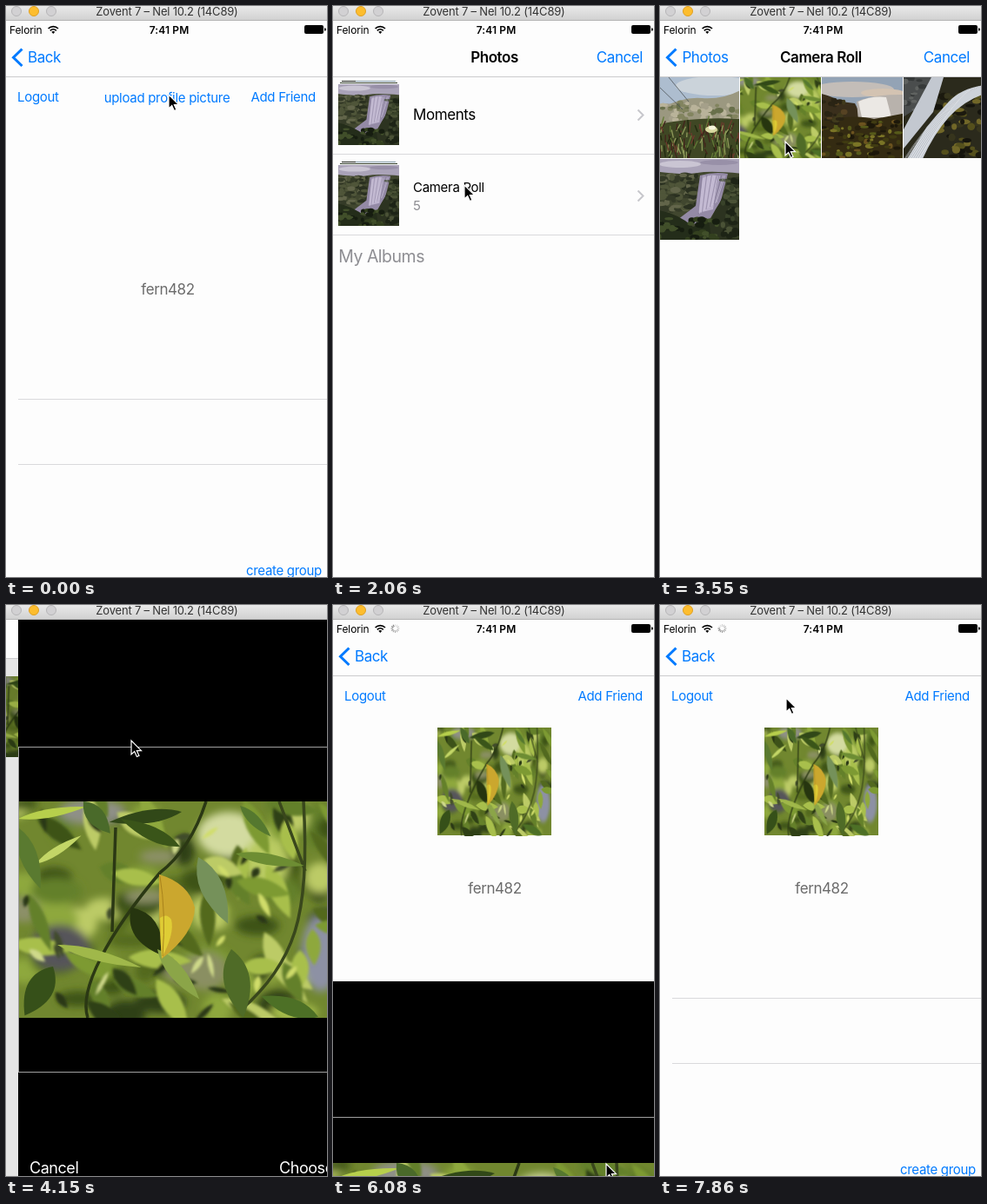
These frames come from a looping animation (369 px wide and 657 px high, 8 s). An HTML page:

```html
<!DOCTYPE html>
<html lang="en">
<head>
<meta charset="utf-8">
<title>Profile picture upload</title>
<style>
  html, body { margin: 0; width: 100%; height: 100%; overflow: hidden; background: #fdfdfd; }
  svg#stage { display: block; width: 369px; height: 657px; --page: #fdfdfd; }
  text { font: 17px Inter, "Open Sans", sans-serif; letter-spacing: -.025em; }
  .s { font-size: 15px; letter-spacing: -.02em; }
  .xs { font-size: 12px; letter-spacing: -.01em; }
  .b { font-weight: 600; }
  .m { text-anchor: middle; }
  .e { text-anchor: end; }
  .link { fill: #007aff; }
  .line { fill: none; stroke: #d9d9dc; }
  .page { fill: var(--page); }
  .arrow { fill: none; stroke: #007aff; stroke-width: 3; }
  .more { fill: none; stroke: #c7c7cc; stroke-width: 2; }
  #shade { mix-blend-mode: darken; }
</style>
</head>
<body>
<svg id="stage" viewBox="0 0 369 657">
  <defs>
    <linearGradient id="bar" x2="0" y2="1">
      <stop stop-color="#e9e9e9"/><stop offset="1" stop-color="#d0d0d0"/>
    </linearGradient>
    <linearGradient id="edge">
      <stop stop-color="#e9e9e9"/><stop offset=".8" stop-color="#e2e2e2"/><stop offset="1" stop-color="#cdcdcd"/>
    </linearGradient>
    <linearGradient id="fade">
      <stop style="stop-color:var(--page)" stop-opacity="0"/>
      <stop offset=".25" style="stop-color:var(--page)"/>
    </linearGradient>
    <filter id="soft"><feGaussianBlur stdDeviation="5"/></filter>
    <filter id="hazy"><feGaussianBlur stdDeviation="1.6"/></filter>
    <filter id="fine"><feGaussianBlur stdDeviation=".6"/></filter>
    <g id="photos"></g>
  </defs>

  <g id="home">
    <rect width="369" height="657" fill="#fdfdfd"/>
    <path class="line" d="M0 81.5H369" style="stroke:#cbcbcd"/>
    <path class="arrow" d="M18.5 49.5L8.5 59.3l10 9.7"/>
    <text class="link" x="25" y="65">Back</text>
    <text class="link s" x="13" y="109.5">Logout</text>
    <text class="link s m" id="upload" x="185" y="111">upload profile picture</text>
    <text class="link s e" x="356" y="109.5">Add Friend</text>
    <g id="avatar" transform="translate(120 141) scale(.3493 .498)">
      <use href="#leaves" width="375" height="249"/>
    </g>
    <text class="m" x="186" y="331.5" fill="#6b6b6b">fern482</text>
    <path class="line" d="M14 452.5H369M14 527.5H369"/>
    <text class="link s e" x="363" y="654.5">create group</text>
  </g>

  <g id="sheet">
    <g id="list">
      <rect class="page" x="-2" y="17" width="375" height="667"/>
      <rect id="picked" x="-2" y="174" width="375" height="90" fill="#cdcdcd"/>
      <path class="line" d="M0 170.5H373M0 263.5H373"/>
      <g id="stacks"></g>
      <text x="92" y="130.5">Moments</text>
      <text class="s" x="92" y="214">Camera Roll</text>
      <text class="s" x="92" y="235" fill="#8e8e93">5</text>
      <path class="more" d="M350.5 119.5l6 6-6 6M350.5 212.5l6 6-6 6"/>
      <text class="e" x="105" y="295" fill="#8e8e93" style="font-size:19.5px">My Albums</text>
    </g>
    <rect id="shade" x="-10" y="82" width="8" height="602" fill="url(#edge)"/>
    <g id="album">
      <rect class="page" x="-2" y="17" width="500" height="667"/>
      <g id="cells"></g>
    </g>
    <rect id="dim" y="17" width="369" height="640"/>
    <g id="nav">
      <rect class="page" x="-2" y="17" width="600" height="64"/>
      <path class="line" d="M-2 81.5H598" style="stroke:#cbcbcd"/>
      <path class="arrow" id="back" d="M18.5 49.5L8.5 59.3l10 9.7"/>
      <text class="m" id="photosTitle" y="65">Photos</text>
      <text class="b" id="rollTitle" y="65">Camera Roll</text>
      <rect x="276" y="40" width="97" height="36" fill="url(#fade)"/>
      <text class="link e" x="356" y="65">Cancel</text>
    </g>
  </g>

  <g id="crop">
    <rect x="-2" y="17" width="375" height="667"/>
    <use href="#leaves" x="-2" y="226" width="375" height="249"/>
    <rect id="frame" x="-1.5" y="163.5" width="374" height="374" fill="none" stroke="#a0a0a0"/>
    <g fill="#fff">
      <text x="11" y="654" style="font-size:18px">Cancel</text>
      <text x="298" y="654" style="font-size:18px">Choose</text>
    </g>
  </g>

  <g id="status">
    <text class="xs" x="4" y="31.5">Felorin</text>
    <g fill="none" stroke="#000" stroke-width="1.7">
      <path d="M48.6 26a8 8 0 0 1 11.4 0M50.8 28.4a5 5 0 0 1 7 0"/>
      <path d="M54.3 32l-2-2.2a3 3 0 0 1 4 0z" fill="#000" stroke="none"/>
    </g>
    <g id="spinner"></g>
    <text class="xs b m" x="187.5" y="31.5" style="letter-spacing:.01em">7:41 PM</text>
    <rect x="343" y="22" width="22" height="10" rx="2"/>
    <path d="M366 25.2q2 .3 2 1.8t-2 1.8z"/>
  </g>

  <g id="window">
    <rect width="369" height="17" fill="url(#bar)"/>
    <path d="M0 16.5H369" stroke="#b4b4b4"/>
    <g fill="#d2d1d3" stroke="#b6b5b7">
      <circle cx="12" cy="6" r="5.5"/>
      <circle cx="32" cy="6" r="5.5" fill="#fdbd2e" stroke="#dfa023"/>
      <circle cx="52" cy="6" r="5.5"/>
    </g>
    <text class="m" x="185" y="11" fill="#333" style="font-size:13px;letter-spacing:-.015em">Zovent 7 – Nel 10.2 (14C89)</text>
  </g>

  <path id="cursor" d="M0 0V16l3.7-3.4 2.7 5.9 2.6-1.1-2.6-5.7h5.1z" stroke="#fff" stroke-width="1.2"/>
</svg>

<script>
const $ = id => document.getElementById(id);
const set = (id, attrs) => {
  for (const k in attrs) $(id).setAttribute(k, attrs[k]);
};

// ---- pictures ----
let seed = 11;
const rnd = (a = 0, b = 1) => {
  seed = (seed * 16807) % 2147483647;
  return +(a + (b - a) * seed / 2147483647).toFixed(2);
};
const pick = list => list[Math.floor(Math.random.call ? rnd(0, list.length - .01) : 0)];
const many = (n, make) => Array.from({ length: n }, (_, i) => make(i)).join('');
const blob = (x, y, rx, ry, fill) => `<ellipse cx="${x}" cy="${y}" rx="${rx}" ry="${ry}" fill="${fill}"/>`;
const shape = (d, fill) => `<path d="${d}" fill="${fill}"/>`;
const stroke = (d, color, w) => `<path d="${d}" fill="none" stroke="${color}" stroke-width="${w}"/>`;
const blur = (id, body) => `<g filter="url(#${id})">${body}</g>`;
const leaf = (x, y, len, w, turn, fill) =>
  `<path transform="translate(${x} ${y}) rotate(${turn})" d="M0 0Q${len * .4} ${-w} ${len} 0Q${len * .4} ${w} 0 0" fill="${fill}"/>`;
const photo = (id, w, h, base, body) =>
  `<symbol id="${id}" viewBox="0 0 ${w} ${h}" preserveAspectRatio="xMidYMid slice">
    <rect width="${w}" height="${h}" fill="${base}"/>${body}</symbol>`;
// Rough ground: small blots scattered in a box.
const texture = (n, [x0, y0, x1, y1], size, colors) =>
  many(n, () => blob(rnd(x0, x1), rnd(y0, y1), rnd(size / 3, size), rnd(size / 4, size / 1.6), pick(colors)));

const light = ['#8ea83c', '#a8bf4c', '#bccb66', '#7d9a33'];
const dark = ['#3d5219', '#52691f', '#64802a', '#2f4016'];
const leaves = photo('leaves', 375, 249, '#71872f',
  blur('soft',
    texture(70, [0, 0, 375, 249], 30, [...light, ...dark, '#8c9068']) +
    blob(48, 168, 34, 26, '#57545a') + blob(348, 175, 22, 44, '#8d91a4') + blob(85, 12, 38, 15, '#8f9087') +
    blob(242, 38, 36, 26, '#d3dba0') + blob(285, 70, 26, 30, '#b9cb62') + blob(215, 195, 26, 22, '#8a8f62')) +
  blur('hazy',
    many(45, () => leaf(rnd(-20, 375), rnd(-20, 235), rnd(40, 75), rnd(14, 24), rnd(-10, 100), pick([...light, ...dark]))) +
    many(30, () => leaf(rnd(0, 375), rnd(0, 240), rnd(14, 34), rnd(5, 10), rnd(0, 180), pick(['#cfd98a', '#2a3815', '#d0dd6a', '#414b2c'])))) +
  blur('fine',
    stroke('M163 82Q198 55 216 0M163 82Q118 135 95 180T80 249M112 30L108 150', '#2b3814', 3.5) +
    stroke('M328 0Q334 100 318 150T256 240M300 0L330 80', '#39471c', 3.5) +
    leaf(0, 20, 80, 10, -10, '#b7cf4c') + leaf(20, 72, 62, 9, -32, '#c3d667') + leaf(75, 0, 48, 20, 50, '#4a6a2a') +
    leaf(188, 12, 84, 15, 172, '#314818') + leaf(186, 52, 75, 16, 205, '#3a5519') +
    leaf(0, 30, 75, 20, 70, '#5a7a30') + leaf(130, 122, 66, 28, 57, '#26350f') +
    leaf(207, 64, 84, 26, 66, '#75915a') + leaf(160, 170, 75, 17, 50, '#8ba548') +
    leaf(255, 5, 50, 12, 45, '#55782f') + leaf(250, 60, 80, 13, 10, '#6d8d33') +
    leaf(40, 190, 65, 30, 120, '#365019') + leaf(345, 248, 70, 20, 200, '#4d7026') +
    leaf(45, 165, 100, 12, 15, '#a0b84a') + leaf(245, 170, 80, 30, 80, '#4f6b27') +
    shape('M162 84Q196 94 203 122Q203 152 165 181Q161 135 162 84z', '#cba72e') +
    shape('M163 134Q171 128 176 136Q180 152 165 180z', '#dfcd35') +
    stroke('M163 86Q170 128 166 178', '#a9831c', 1)));

const dunes = photo('dunes', 93, 93, '#adbdcf',
  blur('fine',
    blob(65, 10, 45, 11, '#cbd3da') +
    shape('M-5 40Q25 22 50 24T98 13V60H-5z', '#9b9880') +
    texture(60, [0, 30, 93, 52], 6, ['#82845f', '#b9b39a', '#69704b', '#a5a08a']) +
    shape('M0 54Q45 45 93 48V93H0z', '#3f4724') +
    many(130, () => {
      const x = rnd(0, 93), y = rnd(58, 98);
      return stroke(`M${x} ${y}l${rnd(-4, 5)} ${-rnd(5, 15)}`, pick(['#627a36', '#20280f', '#6d3a2d', '#8f9a5a', '#43241c']), 1.3);
    }) +
    stroke('M0 10L28 37M12 0L35 28', '#4d5358', .8) +
    blob(61, 60, 7, 4, '#d9d9a0') + blob(62, 58, 4, 2.5, '#f7f6dc')));

const coast = photo('coast', 93, 93, '#93a3b5',
  blur('fine',
    blob(35, 14, 48, 9, '#c3bdb8') + blob(70, 18, 25, 5, '#d3c3b2') +
    shape('M-4 18Q12 22 22 28L38 30 48 50-4 56z', '#3a2f1c') +
    shape('M40 28Q60 19 98 20V50H42z', '#b8b2ac') +
    shape('M42 28Q58 21 74 23L80 46H46z', '#ebe8e4') +
    shape('M-4 50Q40 42 60 48L98 41V98H-4z', '#342b12') +
    texture(90, [0, 50, 93, 93], 5, ['#565a1a', '#1d180a', '#6c531f', '#403b12', '#7a7426', '#28210e']) +
    texture(25, [0, 26, 28, 52], 5, ['#2a2414', '#564223', '#403a1c'])));

const stream = photo('stream', 93, 93, '#2b2a1c',
  blur('fine',
    texture(70, [35, 20, 93, 93], 7, ['#55501c', '#1b190e', '#716728', '#37351d', '#15140d']) +
    shape('M-4-4H40L18 34-4 48z', '#4a4d4d') +
    texture(20, [0, 0, 30, 40], 6, ['#363939', '#5f6260']) +
    shape('M93 9Q66 13 52 28T26 58L2 98H20Q34 66 52 46T96 18z', '#cdd2d9') +
    shape('M32 0H46L34 40 0 82V60z', '#c3c8d0')) +
  many(14, i => stroke(`M${90 - i} ${10 + i / 3}Q${42 + i} 28 ${i * 1.3} 95`, i % 2 ? '#f0f2f5' : '#a9afb8', .6)));

const falls = photo('falls', 93, 93, '#41472f',
  blur('fine',
    shape('M-5-5H98V17Q60 13 45 16T-5 14z', '#aaa3b8') + blob(25, 6, 24, 4, '#cac5d3') + blob(70, 4, 22, 3, '#9890a8') +
    texture(90, [0, 18, 50, 60], 7, ['#4f5539', '#343a27', '#62654a', '#2a3020']) +
    shape('M48 19Q65 14 80 17L72 48 60 68Q42 80 22 70L43 54z', '#948aa6') +
    shape('M51 22Q60 17 68 19L63 58 46 62z', '#bdb3cd') +
    shape('M98 20L80 22Q76 44 66 58L46 98H98z', '#2c3320') +
    texture(50, [74, 24, 95, 90], 6, ['#39432a', '#1d2416', '#4a5236']) +
    shape('M-5 58Q22 62 40 78L58 70 62 98H-5z', '#242d1a') +
    texture(40, [0, 68, 70, 93], 6, ['#33401f', '#161d10', '#414f2a'])) +
  many(16, i => stroke(`M${50 + i * 1.9} 19L${46 + i * 1.5} ${64 - i}`, i % 3 ? '#cfc7dc' : '#857b98', .6)));

$('photos').innerHTML = leaves + dunes + coast + stream + falls;

const tile = (id, x, y, size) => `<use href="#${id}" x="${x}" y="${y}" width="${size}" height="${size}"/>`;
$('cells').innerHTML = ['dunes', 'leaves', 'coast', 'stream', 'falls']
  .map((id, i) => tile(id, -2 + 94 * (i % 4), 82 + 94 * (i >> 2), 93)).join('');
$('stacks').innerHTML = [90, 183].map(y =>
  stroke(`M10 ${y - 3.5}H72`, '#7f98a6', 1) + stroke(`M10 ${y - 3.5}H26`, '#1d211a', 1) +
  stroke(`M8 ${y - 1.5}H74`, '#2f3b28', 1) + tile('falls', 6, y, 70)).join('');
$('spinner').innerHTML = many(12, i =>
  `<path d="M0-2.4V-5" stroke="#555" opacity="${.15 + i * .06}" transform="rotate(${i * 30})"/>`);

// ---- motion ----
const LOOP = 8000, TICK = 148.2, LAST = 53;
const pointer = [
  [0, 187, 102], [1, 187, 90], [2, 187, 81], [3, 187, 105], [9, 187, 105],
  [14, 147, 218], [19, 147, 218], [24, 144, 156], [28, 144, 156],
  [34, 313, 642], [35, 314, 643], [41, 314, 643], [48, 145, 107], [LAST + 1, 145, 107]
];

function pointerAt(n) {
  const i = pointer.findIndex(k => k[0] > n);
  const [n0, x0, y0] = pointer[i - 1], [n1, x1, y1] = pointer[i];
  const u = (n - n0) / (n1 - n0), e = u * u * (3 - 2 * u);
  return [x0 + (x1 - x0) * e, y0 + (y1 - y0) * e];
}

// Share of the way left in a critically damped spring.
const left = (n, start, phase) => {
  if (n < start) return 1;
  const w = phase + 2.706 * (n - start);
  return (1 + w) * Math.exp(-w);
};
const shift = (id, x, y = 0) => set(id, { transform: `translate(${Math.round(x)} ${Math.round(y)})` });
const show = (id, on) => set(id, { visibility: on ? 'visible' : 'hidden' });

function render(n) {
  const rise = left(n, 9, 1.145);
  const push = left(n, 19, 1.805);
  const edit = left(n, 27, 2.2);
  const drop = 1 - left(n, 41, 2.115);
  const pushing = push < 1 && push > .03;
  const editing = n >= 27;
  const picking = n >= 9 && n < 41;

  $('stage').style.setProperty('--page', pushing ? '#f7f7f7' : '#fdfdfd');
  set('upload', { opacity: n < 5 ? 1 : n < 7 ? .2 : 0 });
  show('avatar', n >= 41);
  show('sheet', picking);
  show('picked', picking && n >= 18);
  show('shade', picking && pushing);
  show('crop', editing);
  show('status', n < 27 || n >= 41);
  show('spinner', n >= 41);

  shift('sheet', 0, 667 * rise);
  shift('list', -112 * (1 - push));
  shift('shade', 375 * push);
  shift('album', 375 * push - 112 * (1 - edit));
  shift('nav', -112 * (1 - edit), editing ? -20 : 0);
  set('dim', { opacity: .1 * (1 - edit) });
  set('back', { opacity: (1 - push) ** 4 });
  set('photosTitle', {
    x: 185.5 - 133.5 * (1 - push) ** 1.2,
    fill: push === 1 ? '#000' : pushing ? '#6c95c8' : '#007aff',
    style: `font-weight:${push > .03 ? 600 : 400}`
  });
  set('rollTitle', { x: 138 + 267 * push, opacity: 1 - push });
  shift('crop', 375 * edit, 667 * drop);
  set('frame', { y: drop > 0 ? 173.5 : 163.5 });
  set('spinner', { transform: `translate(71.5 27) rotate(${Math.floor(n * TICK * .012) * 30})` });
  shift('cursor', ...pointerAt(n));
}

let shown = -1;
const begin = performance.now();
function tick() {
  const t = (performance.now() - begin) % LOOP;
  const n = Math.min(LAST, Math.floor((t + 7) / TICK));
  if (n !== shown) render(shown = n);
  requestAnimationFrame(tick);
}
tick();
</script>
</body>
</html>
```
